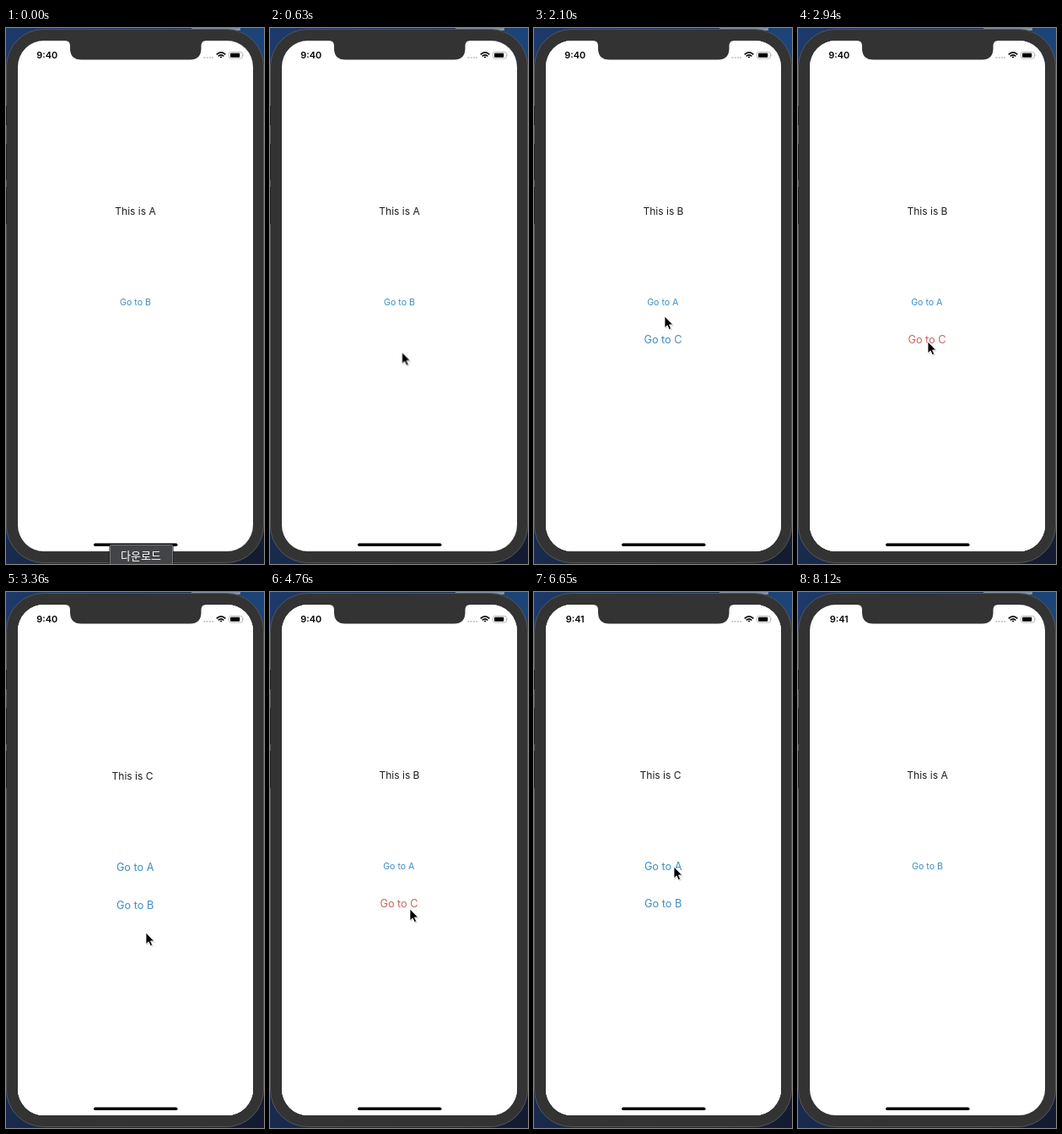
An HTML page that plays this animation: 306x634 px, repeating every 8610 ms.

```html
<!DOCTYPE html>
<html lang="en">
<head>
<meta charset="utf-8">
<title>Screen navigation</title>
<style>
  html, body { margin: 0; width: 100%; height: 100%; overflow: hidden; background: #333; }
  svg { display: block; width: 100vw; height: 100vh; }
  text { font-family: Inter, "Open Sans", sans-serif; text-anchor: middle; fill: #1c1c1e; }
  .title { font-size: 12px; }
  .small { font-size: 10.6px; fill: #3c8cc4; }
  .large { font-size: 12.7px; fill: #3c8cc4; }
  .clock { font-size: 10.9px; font-weight: 600; fill: #000; }
  .tip text { font: 13px "Noto Sans CJK KR", "Noto Sans CJK", "Noto Sans CJK JP", sans-serif; fill: #fff; }

  .anim { animation: 8610ms infinite both; }
  .step { animation-timing-function: step-end; }
  .sheet { animation-timing-function: cubic-bezier(.38, .7, .125, 1); }

  .b { animation-name: sheet-b; }
  .c { animation-name: sheet-c; }
  .cursor { animation-name: cursor; animation-timing-function: ease-in-out; }
  .tip { animation-name: tip; }
  .old { animation-name: old; }
  .new { animation-name: new; }
  .a-to-b { animation-name: a-to-b; }
  .b-to-c { animation-name: b-to-c; }
  .c-to-b { animation-name: c-to-b; }
  .c-to-a { animation-name: c-to-a; }

  @keyframes sheet-b {
    0%, 16.005% { transform: translateY(604px); }
    21.812%, 79.233% { transform: translateY(0); }
    79.234%, 100% { transform: translateY(604px); }
  }
  @keyframes sheet-c {
    0%, 33.972% { transform: translateY(604px); }
    39.779%, 45.099% { transform: translateY(0); }
    50.906%, 62.509% { transform: translateY(604px); }
    68.316%, 79.233% { transform: translateY(0); }
    85.041%, 100% { transform: translateY(604px); }
  }
  @keyframes cursor {
    0% { transform: translate(160px, 660px); }
    1.626% { transform: translate(159px, 636px); }
    9.756%, 21.95% { transform: translate(156px, 326px); }
    24.39%, 28.11% { transform: translate(155px, 341px); }
    30.08%, 34.96% { transform: translate(154px, 371px); }
    38.21%, 39.1% { transform: translate(166px, 403px); }
    41.46% { transform: translate(165px, 382px); }
    42.28%, 47.15% { transform: translate(165px, 379px); }
    48.78% { transform: translate(177px, 395px); }
    50.41%, 53.43% { transform: translate(166px, 407px); }
    55.05%, 68.52% { transform: translate(166px, 375px); }
    71.14% { transform: translate(177px, 350px); }
    75.49%, 86.18% { transform: translate(166px, 325px); }
    87.8% { transform: translate(166px, 320px); }
    94.19% { transform: translate(157px, 640px); }
    100% { transform: translate(160px, 660px); }
  }
  @keyframes tip { 0% { opacity: 1; } 1.626%, 100% { opacity: 0; } }
  @keyframes old { 0% { opacity: 1; } 56.098%, 100% { opacity: 0; } }
  @keyframes new { 0% { opacity: 0; } 56.098%, 100% { opacity: 1; } }
  @keyframes a-to-b { 0%, 22%, 100% { opacity: 1; } 14.634% { opacity: .35; } }
  @keyframes c-to-b { 0%, 51%, 100% { opacity: 1; } 43.902% { opacity: .35; } }
  @keyframes c-to-a { 0%, 85.1%, 100% { opacity: 1; } 78.05% { opacity: .35; } }
  @keyframes b-to-c {
    0%, 39.779%, 68.316%, 100% { fill: #3c8cc4; }
    31.707%, 55.05% { fill: #c8645c; }
  }
</style>
</head>
<body>
<svg viewBox="0 0 306 634" preserveAspectRatio="none">
  <defs>
    <linearGradient id="desk" x2="1" y2="1">
      <stop offset="0" stop-color="#1d3a6b"/>
      <stop offset="1" stop-color="#141b30"/>
    </linearGradient>
    <clipPath id="screen"><rect x="14" y="15" width="279" height="604" rx="31"/></clipPath>
  </defs>

  <!-- desktop and phone body -->
  <rect width="306" height="634" fill="url(#desk)"/>
  <path d="M278 0H306V40H278Z" fill="#1b4478"/>
  <path d="M220 0H278V3H220Z" fill="#8190a3"/>
  <rect x="0.5" y="1.5" width="305" height="631" rx="44" fill="#333" stroke="#55565a"/>
  <path d="M.5 92V115M.5 137V180M.5 188V232" stroke="#222"/>

  <!-- screens -->
  <g clip-path="url(#screen)">
    <rect x="14" y="15" width="279" height="604" fill="#fff"/>
    <text class="title" x="153.5" y="220.7">This is A</text>
    <text class="small anim step a-to-b" x="153.5" y="327.8">Go to B</text>

    <g class="anim sheet b">
      <rect x="14" y="15" width="279" height="604" fill="#fff"/>
      <text class="title" x="153.5" y="220.7">This is B</text>
      <text class="small" x="152.8" y="327.8">Go to A</text>
      <text class="large anim step b-to-c" x="153" y="373.2">Go to C</text>
    </g>

    <g class="anim sheet c">
      <rect x="14" y="15" width="279" height="604" fill="#fff"/>
      <text class="title" x="150" y="220.7">This is C</text>
      <text class="large anim step c-to-a" x="153.2" y="328.5">Go to A</text>
      <text class="large anim step c-to-b" x="153.2" y="373.2">Go to B</text>
    </g>
  </g>

  <!-- notch and status bar -->
  <path d="M70 14V15Q76 15 76 21V24Q76 37.5 89.500 37.500H218Q231.500 37.500 231.500 24V21Q231.500 15 237.500 15V14Z" fill="#333"/>
  <text class="clock anim step old" x="48.700" y="36.200">9:40</text>
  <text class="clock anim step new" x="48.700" y="36.200">9:41</text>
  <path d="M234.500 35H246" stroke="#b5b5b5" stroke-width="1.700" stroke-dasharray="1.800 1.500"/>
  <g fill="none" stroke="#000" stroke-width="1.700">
    <path d="M249.700 31.300Q255 26.500 260.300 31.300M251.700 33.300Q255 30.300 258.300 33.300"/>
    <path d="M253.500 34Q255 32.900 256.500 34L255 35.800Z" fill="#000" stroke="none"/>
  </g>
  <rect x="264.500" y="28.500" width="16" height="7.600" rx="2.200" fill="none" stroke="#a9a9a9" stroke-width=".8"/>
  <rect x="266" y="29.800" width="11.300" height="5" rx="1" fill="#000"/>
  <path d="M281.500 31Q283 32.300 281.500 33.600Z" fill="#a9a9a9"/>
  <rect x="104" y="609.500" width="99.500" height="3.500" rx="1.750" fill="#000"/>

  <!-- dock label -->
  <g class="anim step tip">
    <rect x="122.500" y="610.500" width="76" height="26" rx="2" fill="#111"/>
    <rect x="123.500" y="611.500" width="74" height="26" rx="1" fill="#434447" stroke="#77787a"/>
    <text x="160" y="628.500">다운로드</text>
  </g>

  <g class="anim cursor">
    <path d="M1 1.500V15L4 12.500L6 17L9 16L7 11.500H11Z" fill="#000" opacity=".15"/>
    <path d="M0 0V13.600L3.200 10.800L5.300 15.600L7.600 14.600L5.500 9.900H9.700Z" fill="#000" stroke="#fff" stroke-width=".8"/>
  </g>
</svg>
</body>
</html>
```
